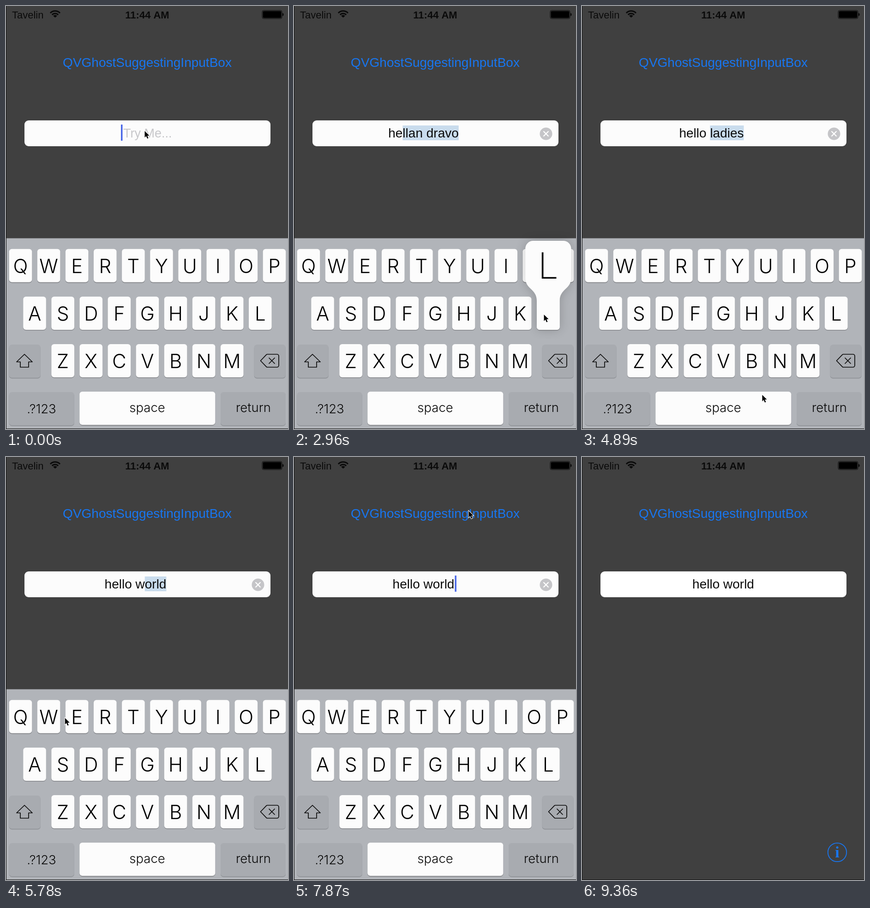
Recreate the animation shown at these times as an HTML page with a canvas. Size 611x917 px, loop 9.9 s.

```html
<!DOCTYPE html>
<html lang="en">
<head>
<meta charset="utf-8">
<title>Autocomplete demo</title>
<style>
  html, body { margin: 0; width: 100%; height: 100%; overflow: hidden; background: #404040; }
  canvas { display: block; width: 611px; height: 917px; }
</style>
</head>
<body>
<canvas id="stage" width="611" height="917"></canvas>
<script>
const ctx = document.getElementById('stage').getContext('2d');
const LOOP = 9900, WAIT = 450, TICK = 147.7;
const SANS = '"Liberation Sans", Arial, sans-serif';
const LIGHT = 'Inter, "Liberation Sans", sans-serif';
const BLUE = '#1876f0', INK = '#0a0a0a', KEY = '#fcfcfc', GREY = '#a8abb0';
const PITCH = 61.1, ROW = 103.1, KEY_W = 49.6, KEY_H = 72;

// The first phrase that starts with the typed text is suggested.
const phrases = ['hunvito', 'hellan dravo', 'hello ladies', 'hello world'];

// What the pointer taps, and on which tick.
const taps = [
  [3, 'H'], [9, 'E'], [17, 'L'], [20, 'L'], [25, 'O'], [29, ' '], [34, 'W'], [41, 'O'],
  [46, 'field'], [51, 'title'], [60, 'exit']
];
const HOLD = 2, CLOSE = 53, EXIT = 60;

const keys = {};
['QWERTYUIOP', 'ASDFGHJKL', 'ZXCVBNM'].forEach((row, r) =>
  [...row].forEach((ch, i) => {
    keys[ch] = { x: 6.7 + PITCH * (i + [0, 0.5, 1.5][r]), y: 526.8 + ROW * r };
  }));

const places = { start: [300, 271], ' ': [390, 843], field: [497, 301], title: [378, 117], exit: [588, 898] };

const placeOf = name => places[name] || [keys[name].x + 15, keys[name].y + 39];

function pointerAt(tick) {
  let from = places.start, leave = 0;
  for (const [arrive, name] of taps) {
    const to = placeOf(name);
    if (tick < arrive) {
      const p = Math.max(0, (tick - leave) / (arrive - leave));
      const e = p * p * (3 - 2 * p);
      return from.map((v, i) => v + (to[i] - v) * e);
    }
    from = to;
    leave = arrive + HOLD;
  }
  return from;
}

const typedAt = tick => taps
  .filter(([t, name]) => name.length === 1 && tick >= t + HOLD)
  .map(([, name]) => name.toLowerCase()).join('');

function box(x, y, w, h, r, fill) {
  ctx.beginPath();
  ctx.roundRect(x, y, w, h, r);
  ctx.fillStyle = fill;
  ctx.fill();
}

function label(text, x, y, font, fill, align = 'center') {
  ctx.font = font;
  ctx.fillStyle = fill;
  ctx.textAlign = align;
  ctx.fillText(text, x, y);
}

function trace(points) {
  ctx.beginPath();
  points.forEach(([x, y]) => ctx.lineTo(x, y));
  ctx.closePath();
}

function line(color, width) {
  ctx.strokeStyle = color;
  ctx.lineWidth = width;
  ctx.stroke();
}

function disc(x, y, r) {
  ctx.beginPath();
  ctx.arc(x, y, r, 0, 7);
}

function cross(x, y, r, color, width) {
  ctx.beginPath();
  for (const s of [-1, 1]) {
    ctx.moveTo(x - r, y - r * s);
    ctx.lineTo(x + r, y + r * s);
  }
  line(color, width);
}

function statusBar() {
  label('Tavelin', 13, 27, '22px ' + SANS, INK, 'left');
  label('11:44 AM', 306, 27, 'bold 22px ' + SANS, INK);
  for (const r of [14.7, 9.2, 3.5]) {
    ctx.beginPath();
    ctx.arc(106.5, 25.5, r, -Math.PI / 2 - 0.8, -Math.PI / 2 + 0.8);
    line(INK, r > 4 ? 3 : 5);
  }
  ctx.beginPath();
  ctx.roundRect(555, 9.5, 43, 18, 3.5);
  line(INK, 1);
  box(556.5, 11, 40, 15, 2, '#000');
  box(599, 15.5, 2.5, 6, [0, 2, 2, 0], INK);
}

const caret = x => box(x, 257, 3.5, 35, 0, '#4a68e8');

function field(tick) {
  box(40, 248, 533, 56, 9, tick >= EXIT ? '#fff' : KEY);
  const typed = typedAt(tick);
  if (!typed) {
    label('Try Me...', 254, 285, '27px ' + SANS, '#c7c7ca', 'left');
    caret(249);
    return;
  }
  const active = tick <= CLOSE, chosen = tick >= 46;
  const text = phrases.find(p => p.startsWith(typed));
  ctx.font = '28px ' + SANS;
  const full = ctx.measureText(text).width;
  const head = ctx.measureText(typed).width;
  const x = (active ? 280.5 : 306) - full / 2;
  if (!chosen) box(x + head, 259, full - head, 32, 0, '#c9dced');
  label(text, x, 285, ctx.font, INK, 'left');
  if (!active) return;
  if (chosen) caret(x + full + 1);
  disc(546, 277, 13.5);
  ctx.fillStyle = '#c5c5c8';
  ctx.fill();
  cross(546, 277, 5.5, '#fff', 2.2);
}

function infoButton() {
  disc(553, 857, 20.2);
  line(BLUE, 1.8);
  label('i', 553, 868, 'bold 34px "Liberation Serif", serif', BLUE);
}

function cap(x, y, w, fill) {
  box(x, y + 1.6, w, KEY_H, 6, fill === KEY ? '#85878b' : '#8c8f94');
  box(x, y, w, KEY_H, 6, fill);
}

function popup(ch) {
  const { x, y } = keys[ch];
  const mid = x + KEY_W / 2, top = y - 121, foot = y + KEY_H;
  const half = KEY_W / 2, wide = KEY_W;
  ctx.save();
  ctx.beginPath();
  ctx.roundRect(mid - wide, top, wide * 2, 80, [17, 17, 0, 0]);
  // The neck narrows on both sides down to the key.
  ctx.moveTo(mid - wide, y - 41);
  ctx.bezierCurveTo(mid - wide, y - 15, mid - half, y - 18, mid - half, y + 10);
  ctx.lineTo(mid - half, foot - 6);
  ctx.arcTo(mid - half, foot, mid, foot, 6);
  ctx.arcTo(mid + half, foot, mid + half, y, 6);
  ctx.lineTo(mid + half, y + 10);
  ctx.bezierCurveTo(mid + half, y - 18, mid + wide, y - 15, mid + wide, y - 41);
  ctx.lineTo(mid - wide, y - 41);
  // Winding of the neck is opposite to the head, so both are filled.
  ctx.shadowColor = 'rgba(0,0,0,.2)';
  ctx.shadowBlur = 22;
  ctx.fillStyle = KEY;
  ctx.fill();
  ctx.restore();
  box(x + 4, foot, KEY_W - 8, 1.5, 0, '#85878b');
  label(ch, mid, y - 39, '200 79px ' + LIGHT, '#000');
}

function icons() {
  ctx.lineJoin = 'round';
  trace([[40, 755], [57, 771.5], [49, 771.5], [49, 783], [31, 783], [31, 771.5], [23, 771.5]]);
  line(INK, 1.7);
  ctx.beginPath();
  ctx.moveTo(551.5, 769);
  ctx.arcTo(565, 755, 580, 755, 3);
  ctx.arcTo(591, 755, 591, 769, 4);
  ctx.arcTo(591, 783, 580, 783, 4);
  ctx.arcTo(565, 783, 551.5, 769, 3);
  ctx.closePath();
  line(INK, 1.7);
  cross(576, 769, 6.5, INK, 1.7);
}

function keyboard(tick) {
  box(0, 503.5, 611, 414, 0, '#b1b4b9');
  const tap = taps.find(([t]) => tick >= t && tick <= t + HOLD);
  const held = tap && tap[1];
  for (const ch in keys) {
    const { x, y } = keys[ch];
    cap(x, y, KEY_W, KEY);
    label(ch, x + KEY_W / 2, y + 52, '300 42px ' + LIGHT, '#000');
  }
  for (const x of [6.7, 537.7]) cap(x, 734, 68, GREY);
  for (const x of [6.7, 465]) cap(x, 837, 141, GREY);
  cap(159.3, 836.1, 294, held === ' ' && tick < tap[0] + HOLD ? GREY : KEY);
  const font = '300 27.5px ' + LIGHT;
  label('.?123', 77, 883, font, INK);
  label('space', 306, 880, font, INK);
  label('return', 536, 880, font, INK);
  icons();
  if (keys[held]) popup(held);
}

function pointer([x, y]) {
  ctx.save();
  ctx.translate(x, y);
  trace([[0.5, 0], [0.5, 14], [3.7, 11], [6.1, 16.5], [8.5, 15.5], [6.2, 10.3], [10.5, 9.9]]);
  line('#fff', 2);
  ctx.fillStyle = '#000';
  ctx.fill();
  ctx.restore();
}

function draw(ms) {
  const tick = Math.max(0, Math.floor((ms - WAIT) / TICK) + 1);
  const sinceClose = tick - CLOSE;
  box(0, 0, 611, 917, 0, '#404040');
  statusBar();
  const dim = sinceClose === 0 || sinceClose === 1;
  label('QVGhostSuggestingInputBox', 306, 132, '28px ' + SANS, dim ? '#2161b2' : BLUE);
  field(tick);
  infoButton();
  if (sinceClose < 2) {
    ctx.save();
    ctx.translate(0, Math.max(0, sinceClose) * 292);
    keyboard(tick);
    ctx.restore();
  }
  box(0, 0, 1, 917, 0, '#101010');
  box(0, 916, 611, 1, 0, '#101010');
  if (tick <= EXIT) pointer(pointerAt(tick));
}

const start = performance.now();
function loop() {
  draw((performance.now() - start) % LOOP);
  requestAnimationFrame(loop);
}
loop();
</script>
</body>
</html>
```
